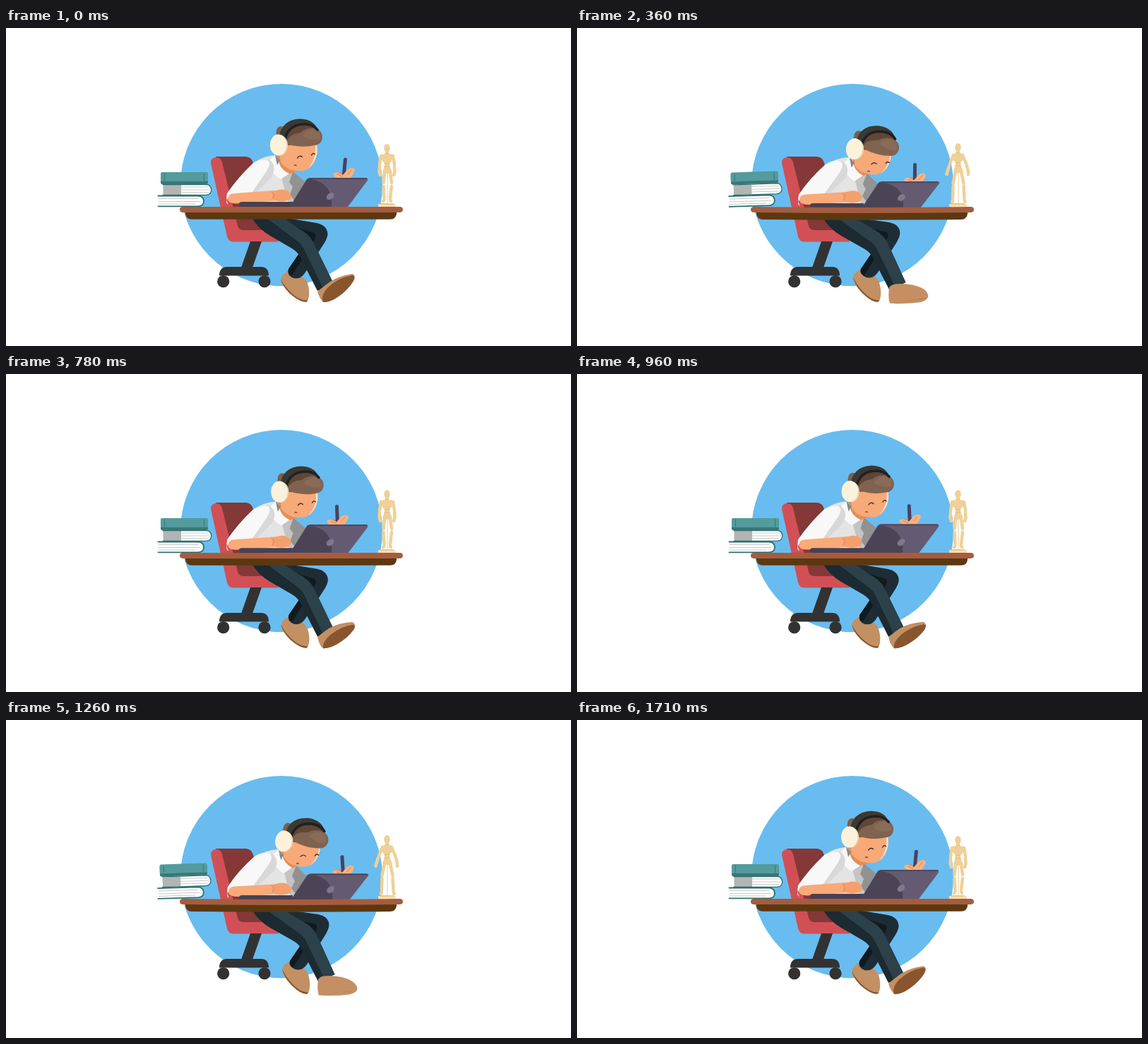
Write an HTML page that moves like this. It is 800x450 px and loops after 1740 ms.

```html
<!DOCTYPE html>
<html lang="en">
<head>
<meta charset="utf-8">
<title>Drawing at the desk</title>
<style>
html, body { margin: 0; width: 100%; height: 100%; overflow: hidden; background: #fff; }
svg { display: block; width: 100vw; height: 100vh; }
.line { fill: none; stroke-linecap: round; stroke-linejoin: round; }
</style>
</head>
<body>
<!-- data-b holds the second pose of a path or transform, data-k the track that blends towards it -->
<svg viewBox="0 0 800 450">
  <circle cx="390" cy="222.200" r="143.100" fill="#69bcef"/>

  <g id="chair">
    <path fill="#843838" d="M297 182H340Q348 183 350 191L374 290H318Z"/>
    <path fill="#d15055" d="M290 191Q290 183 298 183Q304 183 306 190L328 280Q330 286 336 286H372Q384 290 386 302.500H322Q315 302.500 313 295Z"/>
    <path fill="#323232" d="M346 302H362L349 339H333ZM302 350.500Q302 338 313 338H361Q372 338 372 350.500Z"/>
    <circle cx="307.700" cy="358.700" r="8.600" fill="#323232"/>
    <circle cx="366" cy="358.700" r="8.600" fill="#323232"/>
  </g>

  <g id="legs">
    <path fill="#c29062" d="M402 343Q390 347 389 356Q392 370 412 383Q424 390 428 384Q431 374 427 361Q422 350 402 343Z"
      data-b="M404 341Q392 345 391 353Q394 369 413 382Q426 390 429 384Q432 374 428 360Q424 349 404 341Z"/>
    <path fill="#88552e" d="M389 355Q390 363 402 376Q416 388 425 388L428 385Q416 387 403 374Q393 364 389 355Z"
      data-b="M391 352Q392 361 404 375Q417 388 426 388L429 385Q418 387 405 373Q395 362 391 352Z"/>
    <path fill="#1e2d35" d="M392 268L440 276Q455 279 455.500 292Q455 298 449 307L423 347Q417 356 407 354Q397 350 400 341L428 300L400 288Z"
      data-b="M392 268L442 275Q457 278 457.500 290Q457 297 451 306L426 346Q420 355 410 353Q400 349 402 341L430 300L400 288Z"/>
    <path fill="#101a1f" d="M414 283L437 290Q440 295 436 301L405 350Q398 348 400 341L428 300Z"
      data-b="M414 283L439 289Q442 294 438 300L407 350Q400 348 402 341L430 300Z"/>
    <path fill="#1c2a31" d="M348 268Q357 284 374 294L405 312Q413 317 417 325L441 372L464 362L435 303Q429 291 413 283L390 268Z"
      data-b="M348 268Q357 284 374 294L406 312Q415 317 419 325L442 370L465.500 360L439 302Q432 290 415 282L390 268Z"/>
    <path fill="#2c4149" d="M368 268L409 299Q419 306 422 313L449 369L464 362L435 303Q429 291 413 283L392 268Z"
      data-b="M368 268L411 299Q422 306 425 313L451 367L465.500 360L439 302Q432 290 415 282L392 268Z"/>
    <path fill="#c48f63" data-k="foot" d="M441 373Q448 367 459 359Q470 351 490 348Q495 349 493 354Q488 366 473 377Q460 388 450 388Q444 384 441 373Z"
      data-b="M442 367Q445 362.500 452 362.300Q474 361 489 369Q497 374 497.500 380Q497 386 486 388.500Q466 391 443 389.500Q440 384 442 367Z"/>
    <path fill="#88552e" data-k="foot" d="M449 388Q445 379 456 367Q471 353 490 350Q496 350 492 358Q485 370 471 380Q458 389 449 388Z"
      data-b="M449 389Q460 387.600 474 385.800Q488 384 496 383Q496 383 496 383Q484 384.500 470 386.300Q459 387.700 449 389Z"/>
  </g>

  <g id="torso">
    <path fill="#e4e4e4" d="M352 190Q365 181 381 180L404 205L424 219L406 248H335L324 232Z"
      data-b="M355 193Q368 184 385 183L409 209L425 222L408 250H335L324 234Z"/>
    <path fill="#c4c4c4" d="M390 212L404 204L414 216L408 247H400Z" data-b="M394 215L409 207L418 219L410 249H402Z"/>
    <path fill="#929292" d="M406 203L424 218L409 245L402 236L406 225L401 218Z" data-b="M411 206L426 221L411 247L404 238L409 228L405 221Z"/>
    <path fill="#e48d5a" d="M384 180L386 197Q391 207 400 207L416 201V180Z" data-b="M390 183L391 200Q395 210 404 210L420 204V183Z"/>
    <path fill="#f8f8f8" d="M380 180L374 186Q372 205 389 214L401 206Q386 199 386 185Z" data-b="M385 184L379 190Q377 207 393 217L405 209Q392 202 391 188Z"/>
    <path fill="#888" d="M381 180L388 187L384 194Z" data-b="M386 183L393 191L389 198Z"/>
    <path fill="#d8d8d8" d="M371 185Q385 194 376 211L354 233L343 231L368 196Z" data-b="M375 188Q389 197 380 213L356 235L345 233L371 200Z"/>
    <path fill="#f8f8f8" d="M350 191Q360 185 370 187Q377 190 368 204L348 233L315 240Q309 247 315 250Q311 244 313 234Q328 212 350 191Z"
      data-b="M352 193Q363 186 373 189Q380 193 371 206L350 235L316 242Q310 249 316 252Q312 246 314 236Q329 213 352 193Z"/>
  </g>

  <g id="drawing-hand">
    <path fill="#e08a58" d="M465 206Q470 202 477 206L487 198L493 202L484 213H470Z"/>
    <path fill="#4b4160" id="pen" d="M476 206L478 185Q480 182 483 185L481 206L477.500 211Z"/>
    <path fill="#f8b283" d="M463 207Q466 203 471 205L477 208L484 200Q490 196 494 200Q493 206 487 213H472Q464 211 463 207Z"/>
    <path class="line" stroke="#d78252" d="M469 207L476 210M484 207L489 201"/>
  </g>

  <g id="head" transform="translate(0 0) rotate(0 386 166)" data-b="translate(7.500 6) rotate(8 386 166)">
    <path fill="#7d5f4c" d="M383 154Q381 141 388 139L402 141L393 158Z"/>
    <path fill="#f8a978" d="M385 160H440Q443 185 432 196Q424 204 411 202Q397 201 389 190Z"
      data-b="M385 160H438Q441 182 430 192Q422 199 411 198Q397 198 389 188Z"/>
    <path fill="#fce5d0" d="M440 166Q443 184 430 197L428 199Q440 184 438 166Z"
      data-b="M438 166Q440 182 429 193L427 195Q438 182 437 166Z"/>
    <path fill="#3b3933" d="M386 157Q389 130 416 128.500Q438 129 442 147L430 150L400 160Z"/>
    <g id="fringe" transform="rotate(0 410 158)" data-b="rotate(6 410 158)">
      <path fill="#604636" d="M395 160Q397 141 416 137Q436 135 444 148L441 160L400 166Z"/>
      <path fill="#7f6350" d="M397 163Q400 150 417 148Q424 141 436 141.500Q448 144 448 155Q447 165 437 166Q425 169 411 167Q402 166 397 163Z"/>
      <path fill="#896b57" d="M420 153Q423 145 435 143Q446 146 445 156Q435 161 420 153Z"/>
    </g>
    <path class="line" stroke="#23211f" stroke-width="3.600" d="M395 158Q399 139 417 136.500Q433 134 441 144"/>
    <ellipse cx="388" cy="166" rx="11" ry="14.500" fill="#e4d5b3"/>
    <ellipse cx="385.500" cy="165.500" rx="11.700" ry="15" fill="#fcf1da"/>
    <path class="line" stroke="#4b3026" stroke-width="1.400" d="M412.500 184Q415 179.500 419.500 182.500M432.500 180Q434 176 437.500 178.500"/>
    <path class="line" stroke="#9b4c35" stroke-width="1.600" d="M408.500 194.500Q409.500 193 411 194.500"/>
  </g>

  <g id="arm">
    <path fill="#f9aa79" d="M314 243Q314 234 324 234L378 230Q388 229 391 236V244L332 248Q316 250 314 243Z"
      data-b="M315 244Q315 235 325 235.500L378 232.500Q388 231 391 238V246L332 250Q317 251 315 244Z"/>
    <path fill="#f4a06d" d="M377 232Q388 227 396 229Q403 232 404 238Q403 245 394 245Q383 247 377 241Z"
      data-b="M377 234Q388 229 396 231Q403 234 404 240Q403 247 394 247Q383 249 377 243Z"/>
    <path class="line" stroke="#e08a58" stroke-width="1.200" d="M376 232Q382 235 377 242" data-b="M376 234Q382 237 377 244"/>
  </g>

  <g id="tablet">
    <path fill="#484052" d="M330 249Q330 246 334 246H406V253H334Q330 253 330 249Z" data-b="M330 251Q330 248 334 248H406V255H334Q330 255 330 251Z"/>
    <path fill="#645b72" d="M430 212H509Q514 212 511 217L484 253H402L425 215Q427 212 430 212Z"
      data-b="M431 217.500H510Q515 217.500 512.500 221L486 255H403L426 220Q428 217.500 431 217.500Z"/>
    <path fill="#4c4456" d="M427 213Q451 216 458 232Q462 241 461 253H402Z" data-b="M428 218.500Q452 220 459 235Q463 243 462 255H403Z"/>
    <path class="line" stroke="#514859" stroke-width="2" d="M430 213H510" data-b="M431 218.500H511"/>
    <ellipse cx="459" cy="238" rx="6" ry="4.200" fill="#80778d" transform="translate(0 0) rotate(-38 459 238)" data-b="translate(0.500 2) rotate(-38 459 238)"/>
  </g>

  <g id="books" transform="rotate(0 234 252)" data-k="bump" data-b="rotate(-1.800 234 252)">
    <path fill="#fff" d="M215 238H273Q280 239 280 245Q280 251 273 252H215Z"/>
    <path class="line" stroke="#c8c8c8" d="M216 241.500H272M216 245.500H275M216 249H268"/>
    <path class="line" stroke="#2b706b" stroke-width="1.800" d="M215.500 237.500H272Q280 238 280 245Q280 252 272 252.300H215.500"/>
    <path fill="#fff" d="M222 221H284Q291 222 291 229Q291 236 284 236H222Z"/>
    <path class="line" stroke="#c8c8c8" d="M248 225H286M248 229H288M248 232.500H286"/>
    <path fill="#b4b4b4" d="M222.500 222H248V236H222.500Z"/>
    <path class="line" stroke="#2b706b" stroke-width="1.300" d="M222 236.300H283Q290.700 236 290.700 229Q290.500 222 284 221.500H222"/>
    <path fill="#3b7677" d="M219 207H286V219Q286 221 284 221H221Q219 221 219 219Z"/>
    <path fill="#539b9c" d="M221 204H284Q286 204 286 206V217H219V206Q219 204 221 204Z"/>
    <path class="line" stroke="#3b7677" d="M224.500 206V216M280.500 206V216"/>
  </g>

  <g id="mannequin">
    <path fill="#f5dfb4" d="M527 249H552V253H527Z"/>
    <path fill="#e8c98f" d="M530 248H549V250H530Z"/>
    <path class="line" stroke="#ecd5a6" stroke-width="1.200" d="M540 205V248"/>
    <g class="line" stroke="#efd097" stroke-width="4.500">
      <path data-k="bump" d="M531 181L529 193M529 196L528.500 204M529 205L530 208" data-b="M533 180L528 192M527 195L524.500 203M524 204L523.500 207"/>
      <path data-k="bump" d="M548 181L550 193M550 196L550.500 204M550 205L549 208" data-b="M546 180L551 192M552 195L554 203M554 204L554 207"/>
      <path data-k="bump" d="M536 204L534.500 219M534.500 224L535.500 240M535.500 243L534 245" data-b="M536 203L532.500 220M532.500 224L532 240M532 243L531 246"/>
      <path data-k="bump" d="M544 204L546 219M546 224L544 240M544 243L545 245" data-b="M544 203L547.500 220M547.500 224L548.500 240M548.500 243L549.500 246"/>
    </g>
    <g fill="#efd097" transform="translate(0 0)" data-k="bump" data-b="translate(0 -1)">
      <ellipse cx="539.500" cy="170" rx="4.300" ry="6"/>
      <path d="M537 175H542V178L548 179Q549 187 543 191H536Q530 187 531 179L537 178Z"/>
      <ellipse cx="539.500" cy="193" rx="4" ry="3.500"/>
      <path d="M536 195H543L547 204Q540 208 533 204Z"/>
      <path class="line" stroke="#ddb97c" stroke-width=".8" d="M537 177.500H542M536 191.500H543M535 196H544"/>
    </g>
  </g>

  <g id="desk">
    <path fill="#5b3811" d="M254 260H553V263Q552 270.700 544 270.700Q404 270.700 263 270.700Q255 270.700 254 263Z"
      data-b="M254 260H553V263Q552 270.700 544 271Q404 272.700 263 271Q255 270.700 254 263Z"/>
    <path fill="#a65c3e" d="M250 253Q404 253 558 253Q562 253.500 562 257Q562 260.500 558 261Q404 261 250 261Q246 260.500 246 257Q246 253.500 250 253Z"
      data-b="M250 253Q404 255 558 253Q562 253.500 562 257Q562 260.500 558 261Q404 263 250 261Q246 260.500 246 257Q246 253.500 250 253Z"/>
  </g>
</svg>
<script>
const LOOP = 1740, STEP = 30;

// [time, value] keys
const tracks = {
  body: [[0, 0], [360, .94], [430, 1], [600, .81], [880, 0], [960, .1], [1260, .98], [1305, 1], [1470, .68], [LOOP, 0]],
  foot: [[0, 0], [360, .97], [410, 1], [600, .71], [870, 0], [960, .13], [1260, 1], [1470, .52], [LOOP, 0]],
  bump: [[0, 0], [180, 0], [375, 1], [570, 0], [1080, 0], [1260, 1], [1470, .25], [1560, 0], [LOOP, 0]],
  handX: [[0, 0], [360, 0], [600, -7], [780, -9], [960, -7], [1260, -1], [1470, -1], [LOOP, 0]],
  tilt: [[0, 0], [360, -5], [1260, -9], [1470, -5], [LOOP, 0]]
};

// Slope at key i; flat at the ends and at turning points
function slope(keys, i) {
  const [a, b, c] = [keys[i - 1], keys[i], keys[i + 1]];
  if (!a || !c || (b[1] - a[1]) * (c[1] - b[1]) <= 0) return 0;
  return (c[1] - a[1]) / (c[0] - a[0]);
}

function sample(keys, t) {
  const i = keys.findIndex(k => k[0] > t) - 1;
  const [t0, v0] = keys[i], [t1, v1] = keys[i + 1];
  const d = t1 - t0, u = (t - t0) / d, w = 1 - u;
  return v0 * w * w * (1 + 2 * u) + v1 * u * u * (3 - 2 * u)
    + d * u * w * (slope(keys, i) * w - slope(keys, i + 1) * u);
}

const number = /-?\d+(\.\d+)?/g;
const parts = [...document.querySelectorAll('[data-b]')].map(el => {
  const attr = el.hasAttribute('d') ? 'd' : 'transform';
  return { el, attr, from: el.getAttribute(attr), to: el.dataset.b.match(number), track: el.dataset.k || 'body' };
});
const hand = document.getElementById('drawing-hand');
const pen = document.getElementById('pen');

function draw() {
  const t = Math.floor(performance.now() % LOOP / STEP) * STEP;
  const now = {};
  for (const name in tracks) now[name] = sample(tracks[name], t);
  for (const { el, attr, from, to, track } of parts) {
    let i = 0;
    el.setAttribute(attr, from.replace(number, n => (+n + (to[i++] - n) * now[track]).toFixed(3)));
  }
  hand.setAttribute('transform', `translate(${now.handX} ${now.body * 8})`);
  pen.setAttribute('transform', `rotate(${now.tilt} 478 208)`);
  requestAnimationFrame(draw);
}
draw();
</script>
</body>
</html>
```
